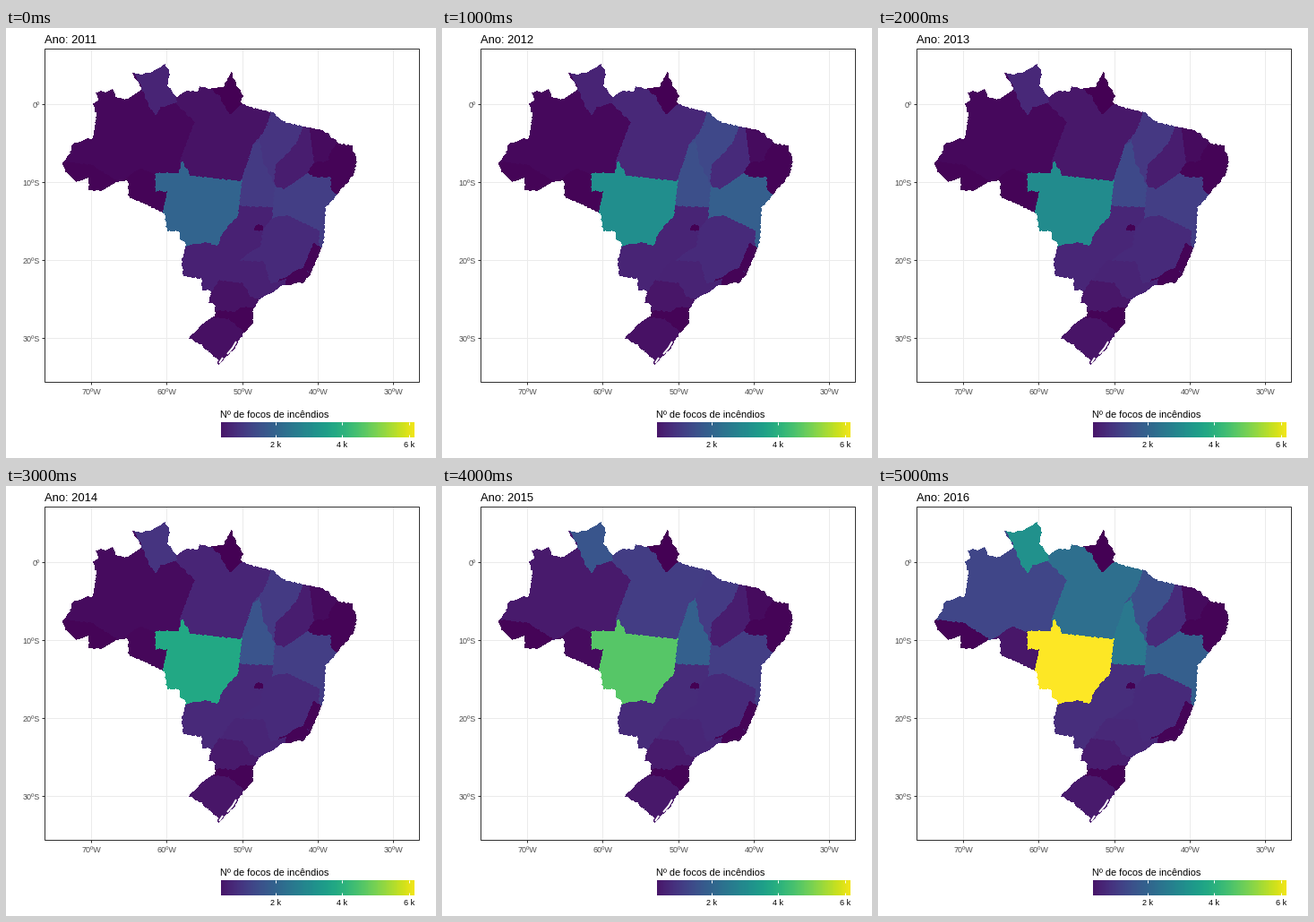
Write a matplotlib script that moves like this. It is 480 by 480 pixels and loops after 6 s.

```python
import numpy as np
import matplotlib.pyplot as plt
from matplotlib.animation import FuncAnimation
from matplotlib.patches import PathPatch, Polygon, Rectangle
from matplotlib.path import Path

SIZE = 480
YEARS = 6
PT = 0.72  # points per pixel at 100 dpi
LEFT, TOP, RIGHT, BOTTOM = 43, 23, 461, 395
VIRIDIS = plt.get_cmap("viridis")
plt.rcParams["font.family"] = "Liberation Sans"

# Key points of the country outline, clockwise from the north, in pixels.
NORTH = [(178, 39), (183, 51), (180, 64), (190, 75), (203, 69), (213, 70),
         (216, 64), (229, 67), (242, 64), (251, 47), (257, 62), (265, 74),
         (262, 82), (272, 87), (297, 93), (311, 104), (338, 110), (354, 113),
         (372, 128), (386, 130)]
EAST = [(392, 148), (388, 164), (371, 184), (357, 200), (355, 237), (350, 252),
        (339, 276), (331, 284), (308, 288), (282, 304), (276, 314), (276, 329),
        (264, 342), (257, 355), (236, 378)]
SOUTH = [(235, 370), (217, 354), (207, 348), (200, 347), (222, 327), (232, 320),
         (232, 309), (225, 306), (228, 293), (218, 293), (217, 280), (197, 277),
         (195, 260), (200, 241), (193, 235), (193, 227), (179, 227), (176, 207)]
WEST = [(153, 196), (136, 189), (135, 170), (122, 173), (107, 182), (91, 181),
        (91, 168), (78, 172), (65, 160), (62, 150), (70, 140), (73, 129),
        (88, 123), (96, 122), (100, 95), (95, 84), (103, 79), (97, 70),
        (112, 70), (118, 66), (123, 76), (134, 79), (151, 67), (145, 58),
        (138, 48), (152, 51), (169, 45)]

# Painted in order; each state may run on under its later neighbours.
STATES = {
    "AM": [(50, 30), (400, 30), (400, 390), (50, 390)],
    "PA": [(189, 60), (189, 83), (211, 104), (194, 148), (196, 175), (280, 180),
           (310, 85)],
    "RR": [(135, 35), (151, 65), (161, 90), (167, 97), (172, 87), (189, 83),
           (190, 40)],
    "AP": [(223, 62), (238, 75), (249, 95), (265, 82), (262, 40)],
    "AC": [(55, 148), (95, 153), (122, 170), (122, 190), (55, 190)],
    "RO": [(128, 171), (150, 157), (162, 162), (195, 170), (185, 215), (130, 210)],
    "BA": [(285, 160), (380, 160), (380, 255), (285, 255)],
    "MA": [(297, 90), (290, 112), (275, 132), (275, 145), (299, 175), (345, 125),
           (335, 95)],
    "PI": [(334, 105), (324, 129), (301, 153), (299, 176), (310, 178), (337, 161),
           (350, 155), (345, 105)],
    "CE": [(338, 105), (344, 150), (370, 150), (376, 115)],
    "PE": [(337, 161), (344, 150), (400, 145), (400, 164), (370, 166), (345, 165)],
    "RN": [(371, 127), (361, 140), (366, 148), (400, 148), (390, 120)],
    "PB": [(361, 140), (378, 142), (400, 141), (400, 151), (374, 155), (360, 152)],
    "AL": [(363, 164), (400, 162), (385, 185)],
    "SE": [(363, 165), (382, 182), (370, 187), (363, 180)],
    "GO": [(240, 190), (297, 190), (296, 215), (300, 265), (225, 265), (225, 225)],
    "TO": [(275, 132), (282, 125), (286, 149), (299, 175), (297, 199), (250, 197),
           (262, 171), (271, 146)],
    "MG": [(297, 212), (313, 209), (349, 226), (345, 285), (305, 295), (255, 262),
           (284, 243), (287, 226)],
    "ES": [(354, 247), (343, 240), (332, 267), (345, 280)],
    "RJ": [(332, 267), (305, 281), (300, 295), (350, 290)],
    "SP": [(245, 259), (287, 261), (294, 285), (311, 281), (309, 305), (270, 310),
           (225, 285)],
    "MS": [(185, 230), (235, 236), (255, 256), (236, 284), (229, 300), (190, 290)],
    "PR": [(238, 282), (264, 285), (272, 300), (290, 306), (280, 325), (215, 320),
           (229, 294)],
    "SC": [(220, 314), (254, 317), (262, 312), (290, 312), (280, 345), (220, 330)],
    "RS": [(220, 322), (248, 325), (267, 341), (250, 390), (190, 360)],
    "MT": [(167, 162), (193, 162), (196, 149), (205, 165), (262, 171), (258, 208),
           (239, 230), (236, 242), (222, 238), (195, 243), (170, 230), (180, 181),
           (167, 181)],
    "DF": [(278, 220), (286, 220), (286, 225), (278, 225)],
}

# Percent of the colour scale: first level, rise over the years, extra in dry
# years, and how late the rise comes. States not listed stay quiet.
QUIET = (1, 0, 0, 1)
TRENDS = {
    "MT": (32, 57, 11, 1.4), "TO": (17, 18, 5, 1.4), "PA": (5, 25, 6, 3),
    "RR": (10, 40, 0, 4), "AM": (2, 19, 0, 6), "BA": (18, 0, 12, 1),
    "MA": (15, 3, 6, 1), "PI": (8, 0, 4, 1), "MG": (12, 0, 0, 1),
    "GO": (9, 4, 0, 1), "MS": (9, 4, 0, 1), "SP": (9, 2, 0, 1),
    "PR": (5, 3, 0, 1), "RS": (4, 3, 0, 1), "CE": (3, 0, 0, 1),
    "RO": (1, 5, 0, 4), "AP": (0, 0, 0, 1), "DF": (0, 0, 0, 1),
}
DRY_YEARS = (2012, 2016)


def level(name, year):
    base, rise, dry, late = TRENDS.get(name, QUIET)
    grown = ((year - 2011) / (YEARS - 1)) ** late
    return (base + rise * grown + dry * (year in DRY_YEARS)) / 100


def rough(points):
    """Ragged closed border; the shift depends on place only, so neighbours agree."""
    pts = np.array(points, float)
    parts = []
    for a, b in zip(pts, np.roll(pts, -1, axis=0)):
        n = max(1, int(np.hypot(*(b - a)) / 2))
        parts.append(a + (b - a) * np.arange(n)[:, None] / n)
    x, y = np.concatenate(parts).T
    dx = 0.7 * np.sin(1.3 * x + 2.1 * y)
    dy = 0.7 * np.sin(2.3 * x - 1.7 * y)
    return np.column_stack([x + dx + 0.5, y + dy + 0.5])


def label(x, y, text, px, color="black", ha="center"):
    return ax.text(x, y, text, size=px * PT, color=color, ha=ha, va="baseline",
                   zorder=9)


def line(xs, ys, color, z, width=1):
    return ax.plot(xs, ys, color=color, lw=width * PT, zorder=z,
                   solid_capstyle="butt")[0]


def degrees(value, letter):
    return f"{abs(value)}º{letter if value else ''}"


fig = plt.figure(figsize=(4.8, 4.8), dpi=100, facecolor="white")
ax = fig.add_axes([0, 0, 1, 1])
ax.axis("off")

fills = {name: ax.add_patch(Polygon(rough(pts), lw=0, antialiased=False, zorder=2))
         for name, pts in STATES.items()}

# White surround with a hole in the shape of the country.
stage = np.array([(0, 0), (0, SIZE), (SIZE, SIZE), (SIZE, 0)], float)
coast = rough(NORTH + EAST + SOUTH + WEST)
surround = Path.make_compound_path(
    *[Path(np.vstack([p, p[:1]]), closed=True) for p in (stage, coast)])
ax.add_patch(PathPatch(surround, fc="white", lw=0, antialiased=False, zorder=3))

# Coastal lagoons
line([257, 253, 247], [350, 357, 364], "white", 3, 2)
line([242, 238], [368, 374], "white", 3, 2)

for lon in range(-70, -20, 10):
    x = int(685 + 8.42 * lon)
    line([x, x], [TOP, BOTTOM], "#EBEBEB", 4).set_clip_path(surround, ax.transData)
    line([x, x], [BOTTOM, BOTTOM + 3], "#333333", 5)
    label(x + 0.5, 409, degrees(lon, "W"), 9, "#4D4D4D")
for lat in range(0, -40, -10):
    y = int(85 - 8.7 * lat)
    line([LEFT, RIGHT], [y, y], "#EBEBEB", 4).set_clip_path(surround, ax.transData)
    line([LEFT - 3, LEFT], [y, y], "#333333", 5)
    label(38, y + 4, degrees(lat, "S"), 9, "#4D4D4D", "right")
ax.add_patch(Rectangle((LEFT, TOP), RIGHT - LEFT, BOTTOM - TOP, fill=False,
                       ec="#333333", lw=PT, zorder=6))

# Legend
label(239, 435, "Nº de focos de incêndios", 11, ha="left")
ax.imshow(np.linspace(0.06, 0.98, 216)[None, :], cmap=VIRIDIS, vmin=0, vmax=1,
          extent=(240, 456, 457, 440), aspect="auto", interpolation="nearest",
          zorder=7)
for k in (2, 4, 6):
    x = round(226 + 37.3 * k)
    line([x, x], [440, 443], "white", 8)
    line([x, x], [454, 457], "white", 8)
    label(x, 468, f"{k} k", 9)

title = label(43, 17, "", 13, ha="left")
ax.set_xlim(0, SIZE)
ax.set_ylim(SIZE, 0)


def draw(i):
    year = 2011 + i
    title.set_text(f"Ano: {year}")
    for name, patch in fills.items():
        patch.set_facecolor(VIRIDIS(level(name, year)))
    return [title, *fills.values()]


anim = FuncAnimation(fig, draw, frames=YEARS, init_func=lambda: draw(0),
                     interval=1000, repeat=True, repeat_delay=0, blit=False)
plt.show()
```
